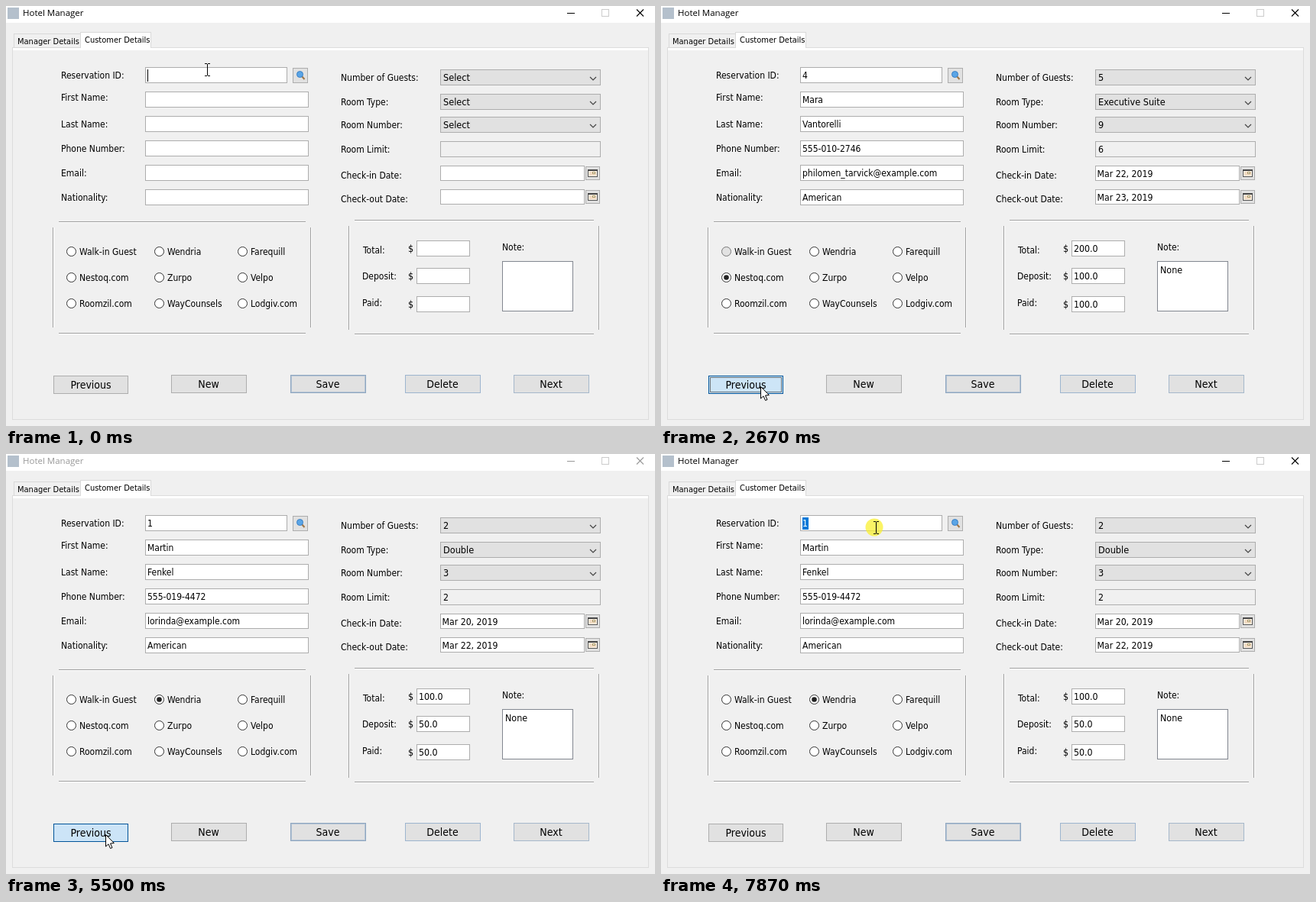
Animation, 849 px wide and 550 px high, one loop 8000 ms. Source, as an HTML page with a canvas:

```html
<!DOCTYPE html>
<html lang="en">
<head>
<meta charset="utf-8">
<title>Hotel Manager</title>
<style>
html, body { margin: 0; width: 100%; height: 100%; overflow: hidden; background: #f0f0f0; }
canvas { display: block; }
</style>
</head>
<body>
<canvas id="stage" width="849" height="550"></canvas>
<script>
const g = document.getElementById('stage').getContext('2d');
const LOOP = 8000;
const UI = '"DejaVu Sans Condensed", "Noto Sans", sans-serif';
const TITLE = '"Open Sans", "Noto Sans", sans-serif';
const BLUE = '#0078d7', GREY = '#adadad', FACE = '#e1e1e1', HOVER = '#e5f1fb';

// id, first, last, phone, email, nationality | guests, type, room, limit, in, out | total, deposit, paid, note | source
const EMPTY = ['', '', '', '', '', '', 'Select', 'Select', 'Select', '', '', '', '', '', '', '', -1];
const RECORDS = {
  5: ['5', 'Leonora', 'Castwick', '555-017-6120', 'orville_dastin@example.com', 'American',
    '3', 'Triple', '7', '3', 'Mar 22, 2019', 'Mar 25, 2019', '150.0', '75.0', '75.0', 'None', 0],
  4: ['4', 'Mara', 'Vantorelli', '555-010-2746', 'philomen_tarvick@example.com', 'American',
    '5', 'Executive Suite', '9', '6', 'Mar 22, 2019', 'Mar 23, 2019', '200.0', '100.0', '100.0', 'None', 3],
  3: ['3', 'Rosalinde', 'Pelotina', '555-014-3908', 'wendell_parquin@example.org', 'American',
    '2', 'Double', '5', '2', 'Mar 22, 2019', 'Mar 24, 2019', '100.0', '50.0', '50.0', 'None', 4],
  2: ['2', 'Gordon', 'Wistel', '555-012-8351', 'tamsin@example.com', 'American',
    '2', 'Deluxe Double', '4', '2', 'Mar 21, 2019', 'Mar 23, 2019', '120.0', '60.0', '60.0', 'None', 6],
  1: ['1', 'Martin', 'Fenkel', '555-019-4472', 'lorinda@example.com', 'American',
    '2', 'Double', '3', '2', 'Mar 20, 2019', 'Mar 22, 2019', '100.0', '50.0', '50.0', 'None', 1]
};
const SHOWN = [[0, 0], [1505, 5], [2660, 4], [3430, 3], [4095, 2], [4775, 1]];
const SOURCES = ['Walk-in Guest', 'Wendria', 'Farequill', 'Nestoq.com', 'Zurpo', 'Velpo',
  'Roomzil.com', 'WayCounsels', 'Lodgiv.com'];

// press start, release
const PRESSES = [[2315, 2660], [3215, 3430], [3935, 4095], [4615, 4775], [5335, 5510]];
const GLOWS = [...PRESSES.map(p => [p[0], p[0] + 155]), [1120, 1280], [6310, 6470], [7490, 7600], [7780, LOOP]];
const PATH = [[0, 263, 83], [320, 263, 83], [880, 397, 97], [1040, 386, 93], [1510, 386, 93],
  [2100, 134, 517], [2250, 130, 498], [5620, 130, 498], [6070, 432, 308], [6470, 432, 308],
  [6930, 281, 95], [7330, 280, 93], [7490, 281, 96], [LOOP, 281, 96]];
const OPEN = 5570, CLOSE = 6470, REFOCUS = 7490;

const clamp = v => Math.max(0, Math.min(1, v));
const within = (t, a, b) => t >= a && t < b;

function box(x, y, x2, y2, fill, line) {
  g.fillStyle = fill;
  g.fillRect(x, y, x2 - x + 1, y2 - y + 1);
  if (line) {
    g.strokeStyle = line;
    g.lineWidth = 1;
    g.strokeRect(x + .5, y + .5, x2 - x, y2 - y);
  }
}
function text(s, x, y, size = 12, { align = 'left', color = '#000', font = UI } = {}) {
  g.font = size + 'px ' + font;
  g.textAlign = align;
  g.fillStyle = color;
  g.fillText(s, x, y);
}
function poly(points, color, width = 1) {
  g.beginPath();
  points.forEach(p => g.lineTo(...p));
  g.strokeStyle = color;
  g.lineWidth = width;
  g.stroke();
}
function disc(x, y, r, fill, line) {
  g.beginPath();
  g.arc(x, y, r, 0, 7);
  g.fillStyle = fill;
  g.fill();
  if (line) {
    g.strokeStyle = line;
    g.lineWidth = 1;
    g.stroke();
  }
}
function dotted(x, y, x2, y2) {
  g.setLineDash([1, 1]);
  g.strokeStyle = '#000';
  g.lineWidth = 1;
  g.strokeRect(x + .5, y + .5, x2 - x, y2 - y);
  g.setLineDash([]);
}
function cross(x, y, color) {
  poly([[x - 4.5, y - 4.5], [x + 4.5, y + 4.5]], color, 1.1);
  poly([[x - 4.5, y + 4.5], [x + 4.5, y - 4.5]], color, 1.1);
}
function mix(from, to, k) {
  return `rgb(${from.map((c, i) => Math.round(c + (to[i] - c) * k))})`;
}

function drawWindow(active) {
  box(0, 0, 848, 549, '#f0f0f0');
  box(0, 0, 848, 21, '#fff');
  box(2, 2, 16, 16, '#b4c0cc');
  const ink = active ? '#000' : '#999';
  text('Hotel Manager', 22, 13, 11.5, { font: TITLE, color: ink });
  box(734, 9, 743, 9, ink);
  box(779, 4, 788, 13, '#fff', '#ccc');
  cross(829.5, 9, ink);

  box(8, 54, 840, 541, '#f0f0f0', '#dcdcdc');
  box(9, 55, 839, 57, '#fff');
  box(10, 36, 97, 54, '#f0f0f0', '#d9d9d9');
  box(97, 34, 189, 54, '#fff', '#d9d9d9');
  box(98, 53, 188, 56, '#fff');
  text('Manager Details', 15, 50, 11);
  text('Customer Details', 103, 48, 11);
}

function drawPanel(l, r, x, x2, top, bottom, y, y2) {
  const line = '#a0a0a0';
  box(x, top, x2, top, line);
  box(x, top + 1, x2, top + 1, '#fff');
  box(x, bottom, x2, bottom, line);
  box(x, bottom + 1, x2, bottom + 1, '#fff');
  box(l, y, l, y2, line);
  box(l + 1, y, l + 1, y2, '#fff');
  box(r, y, r, y2, line);
  box(r + 1, y, r + 1, y2, '#fff');
}

function drawForm(rec, id) {
  const left = ['Reservation ID:', 'First Name:', 'Last Name:', 'Phone Number:', 'Email:', 'Nationality:'];
  left.forEach((label, i) => {
    const y = 80 + 32 * i;
    text(label, 72, [95, 124, 159, 191, 223, 255][i]);
    box(182, y, i ? 395 : 367, y + 20.999 | 0, '#fff', GREY);
    text(i ? rec[i] : id, 185, y + 15);
  });

  const right = ['Number of Guests:', 'Room Type:', 'Room Number:', 'Room Limit:', 'Check-in Date:', 'Check-out Date:'];
  right.forEach((label, i) => {
    const y = [83, 115, 145, 177, 209, 240][i], combo = i < 3, date = i > 3;
    text(label, 438, [98, 130, 160, 192, 226, 257][i]);
    box(568, y, date ? 756 : 777, y + (date ? 19 : 20), combo ? FACE : date ? '#fff' : '#f0f0f0', GREY);
    text(rec[6 + i], date ? 570.5 : 572, y + 15, combo ? 12.6 : 12.2);
    if (combo) poly([[764, y + 10], [768, y + 14], [772, y + 10]], '#444', 1.2);
    if (date) {
      box(758, y + 1, 776, y + 18, FACE, GREY);
      box(761, y + 5, 773, y + 14, '#fbf3e8', '#555');
      box(761, y + 5, 773, y + 6, '#444');
      box(763, y + 8, 771, y + 12, '#f3dcc4');
      box(767, y + 8, 770, y + 10, '#fff', '#a96');
    }
  });

  ['Total:', 'Deposit:', 'Paid:'].forEach((label, i) => {
    const y = [307, 343, 380][i];
    text(label, i ? 466 : 467, [324, 358, 393][i]);
    text('$', 526, y + 15, 12.5);
    box(537, y, 606, y + 20, '#fff', GREY);
    text(rec[12 + i], 540, y + 15, 12.3);
  });
  text('Note:', 649, 320);
  box(649, 334, 741, 399, '#fff', '#828790');
  text(rec[15], 653, 350, 12.4);
}

function drawSources(chosen, fading) {
  SOURCES.forEach((name, i) => {
    const col = i % 3, x = [85.5, 200.5, 309.5][col], y = 321.5 + 34 * (i / 3 | 0);
    disc(x, y, 6, i === fading ? '#e2e2e2' : '#fff', i === fading ? '#777' : '#333');
    if (i === chosen) disc(x, y, 3.3, '#222');
    text(name, [96, 211, 320][col], y + 4.5);
  });
}

function drawSearch(t) {
  const focus = within(t, 1200, 2315), over = within(t, 960, 1600);
  box(375, 81, 394, 100, within(t, 1200, 1510) ? '#cce4f7' : over ? HOVER : FACE, focus || over ? BLUE : GREY);
  if (focus) dotted(377, 83, 392, 98);
  poly([[387, 92], [390.5, 96]], '#a07848', 2);
  disc(384.5, 89.5, 4, '#5aa5e6', '#3a7fc4');
}

function drawButtons(t) {
  [['New', 216, GREY], ['Save', 372, '#8ea6c0'], ['Delete', 522, '#9db5cf'], ['Next', 664, '#a6b8cb']].forEach(([name, x, line]) => {
    box(x, 483, x + 98, 506, FACE, line);
    if (name === 'Save') box(x + 1, 484, x + 97, 505, FACE, '#b4c3d4');
    text(name, x + 49, 500, 14, { align: 'center' });
  });

  let press = 0;
  PRESSES.forEach(([a, b]) => press = Math.max(press, t < b ? clamp((t - a - 10) / 100) : clamp(1 - (t - b) / 230)));
  const over = within(t, 2190, CLOSE);
  const focus = within(t, 2380, 5490) || within(t, CLOSE, REFOCUS);
  let fill = FACE;
  if (over) fill = mix([229, 241, 251], [204, 228, 247], press);
  else if (focus) fill = mix([229, 241, 251], [225, 225, 225], .5 - .5 * Math.cos((t - CLOSE) / 230));
  box(62, 484, 159, 507, fill, over || focus ? press > .5 ? '#005499' : BLUE : GREY);
  if (focus) dotted(64, 486, 157, 505);
  text('Previous', 111, 501, 14, { align: 'center' });
}

function drawDialog(t) {
  g.save();
  g.shadowColor = 'rgba(0,0,0,.28)';
  g.shadowBlur = 8;
  g.shadowOffsetY = 2;
  box(293, 216, 556, 332, '#f0f0f0');
  g.restore();
  box(293, 216, 556, 332, '#f0f0f0', '#1883d7');
  box(294, 217, 555, 241, '#fff');
  text('Message', 297, 233, 11.5, { font: TITLE });
  cross(541, 229, '#000');

  const shine = g.createLinearGradient(0, 252, 0, 284);
  shine.addColorStop(0, '#5b86de');
  shine.addColorStop(.5, '#2a50b8');
  shine.addColorStop(1, '#1735a0');
  disc(320, 268, 16, '#8a93a8');
  disc(320, 268, 14.5, shine, '#d5def2');
  disc(320, 260.5, 2.3, '#fff');
  box(317, 265, 321, 266, '#fff');
  box(318, 265, 321, 275, '#fff');
  box(316, 275, 323, 276, '#fff');

  text('There is no other data before this.', 351, 273, 11.7);
  box(388, 295, 460, 317, t > 6000 ? HOVER : FACE, BLUE);
  dotted(390, 297, 458, 315);
  text('OK', 424.5, 311, 12, { align: 'center' });
}

function pointerAt(t) {
  let i = 1;
  while (PATH[i][0] < t && i < PATH.length - 1) i++;
  const [a, x, y] = PATH[i - 1], [b, x2, y2] = PATH[i];
  const k = clamp((t - a) / (b - a)), e = k * k * (3 - 2 * k);
  return [x + (x2 - x) * e, y + (y2 - y) * e];
}

function drawPointer(t) {
  const [x, y] = pointerAt(t).map(Math.round);
  const beam = t >= REFOCUS || t < 880 && x < 368;
  if (GLOWS.some(([a, b]) => within(t, a, b))) disc(x - (beam ? 2 : 3), y, 11.5, 'rgba(250,240,50,.75)');
  g.save();
  g.translate(x, y);
  if (beam) {
    box(0, -7, 0, 7, '#000');
    box(-3, -8, -1, -8, '#000');
    box(1, -8, 3, -8, '#000');
    box(-3, 8, -1, 8, '#000');
    box(1, 8, 3, 8, '#000');
  } else {
    g.beginPath();
    [[.5, .5], [.5, 16], [4, 12.8], [6.6, 18.5], [9, 17.5], [6.5, 12], [11.3, 11.5]].forEach(p => g.lineTo(...p));
    g.closePath();
    g.fillStyle = '#fff';
    g.fill();
    g.strokeStyle = '#000';
    g.lineWidth = 1;
    g.stroke();
  }
  g.restore();
}

function draw(t) {
  const step = SHOWN.filter(s => s[0] <= t).length - 1;
  const [since, key] = SHOWN[step];
  const rec = RECORDS[key] || EMPTY;
  const before = step ? RECORDS[SHOWN[step - 1][1]] : null;
  const typed = t >= 240;

  drawWindow(!within(t, 5490, CLOSE));
  drawForm(rec, key ? rec[0] : typed ? '5' : '');
  if (t < 1200 && t % 1000 < 500) box(typed ? 192 : 185, 83, typed ? 192 : 185, 98, '#000');
  if (t >= 7780) {
    box(185, 83, 192, 98, BLUE);
    text('1', 185, 95, 12, { color: '#fff' });
  }
  drawSearch(t);
  drawPanel(61, 398, 69, 391, 282, 428, 290, 420);
  drawPanel(448, 775, 456, 768, 280, 429, 288, 423);
  drawSources(rec[16], before && t - since < 150 ? before[16] : -1);
  drawButtons(t);
  if (within(t, OPEN, CLOSE)) drawDialog(t);
  drawPointer(t);
}

function tick() {
  draw(performance.now() % LOOP);
  requestAnimationFrame(tick);
}
tick();
</script>
</body>
</html>
```
